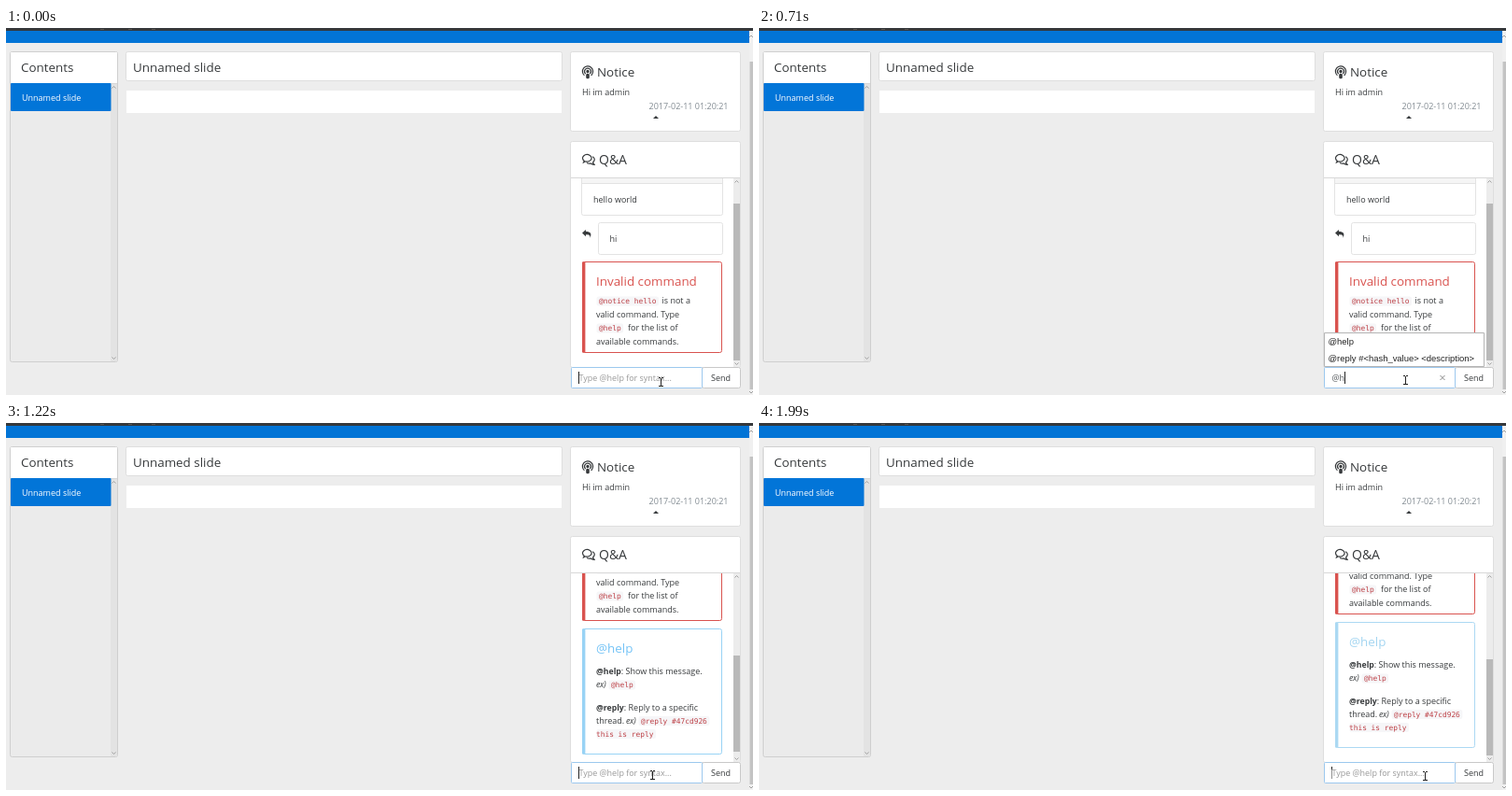
Animation of 800 by 393 pixels, one loop 2070 ms. Source, as an HTML page with a canvas:

```html
<!DOCTYPE html>
<html lang="en">
<head>
<meta charset="utf-8">
<title>Slide Q&amp;A</title>
<style>
html, body { margin: 0; width: 100%; height: 100%; overflow: hidden; background: #ededed; }
canvas { display: block; width: 100vw; height: 100vh; }
</style>
</head>
<body>
<canvas id="stage" width="800" height="393"></canvas>
<script>
const ctx = document.getElementById('stage').getContext('2d');
const LOOP = 2070;
const SANS = '"Open Sans", "Noto Sans", sans-serif';
const MONO = '"DejaVu Sans Mono", monospace';
const ARIAL = '"Liberation Sans", Arial, sans-serif';
const INK = '#373a3c', RED = '#d9534f', CODE = '#bd4147', BLUE = '#0275d8', FOCUS = '#9cc8ee';

// Each track is a list of [start time, value]; values hold until the next start.
const mouseTrack = [[0, [701, 379]], [80, [697, 378]], [160, [694, 377]], [240, [692, 377]], [1990, [713, 378]]];
const typedTrack = [[0, ''], [350, '@'], [710, '@h'], [850, '@he'], [920, '@hel'], [990, '@help'], [1140, '']];
const menuTrack = [[0, 0], [430, 2], [780, 1], [1140, 0]];
const caretTrack = [[0, 1], [1530, 0.6], [1610, 0.2], [1690, 0.5]];
const scrollTrack = [
  [0, { y: 0, thumb: 188, size: 168 }],
  [1140, { y: 20, thumb: 190, size: 103, title: '#84c5ee', edge: '#a6d8f5' }],
  [1220, { y: 136, thumb: 249, size: 103, title: '#74c3f6', edge: '#98d3f5' }],
  [1300, { y: 143, thumb: 253, size: 103, title: '#a3d5f1', edge: '#acd9f3' }]
];

function at(track, time) {
  let value = track[0][1];
  for (const [start, next] of track) if (time >= start) value = next;
  return value;
}

function rect(x, y, w, h, color) {
  ctx.fillStyle = color;
  ctx.fillRect(x, y, w, h);
}

function box(x, y, w, h, fill, border, radius = 2) {
  ctx.beginPath();
  ctx.roundRect(x + 0.5, y + 0.5, w - 1, h - 1, radius);
  if (fill) { ctx.fillStyle = fill; ctx.fill(); }
  if (border) { ctx.strokeStyle = border; ctx.lineWidth = 1; ctx.stroke(); }
}

// Draws text and returns its right edge.
function text(str, x, y, { size = 9, color = INK, style = '', family = SANS } = {}) {
  ctx.font = `${style} ${size}px ${family}`;
  ctx.fillStyle = color;
  ctx.fillText(str, x, y);
  return x + ctx.measureText(str).width;
}

const heading = (str, x, y, color = INK) => text(str, x, y, { size: 13.4, color });

function code(str, x, y, pad = 3) {
  const opts = { size: 7.85, color: CODE, family: MONO };
  ctx.font = `${opts.size}px ${MONO}`;
  const width = ctx.measureText(str).width;
  box(x, y - 8, width + pad + 3, 11, '#f6f6f8', null);
  text(str, x + pad, y, opts);
}

function triangle(x, y, half, height, color) {
  ctx.fillStyle = color;
  ctx.beginPath();
  ctx.moveTo(x - half, y + height);
  ctx.lineTo(x, y);
  ctx.lineTo(x + half, y + height);
  ctx.fill();
}

function chevron(x, y, dir) {
  ctx.strokeStyle = '#a0a0a0';
  ctx.lineWidth = 1;
  ctx.beginPath();
  ctx.moveTo(x - 2, y + dir);
  ctx.lineTo(x, y - dir);
  ctx.lineTo(x + 2, y + dir);
  ctx.stroke();
}

function podcastIcon(x, y) {
  ctx.strokeStyle = ctx.fillStyle = INK;
  ctx.lineWidth = 1.2;
  for (const r of [5.6, 3.4]) {
    ctx.beginPath();
    ctx.arc(x, y, r, Math.PI * 0.72, Math.PI * 2.28);
    ctx.stroke();
  }
  ctx.beginPath();
  ctx.arc(x, y, 1.7, 0, Math.PI * 2);
  ctx.roundRect(x - 1.8, y + 2.2, 3.6, 5.6, 1.5);
  ctx.fill();
}

function commentsIcon(x, y) {
  ctx.strokeStyle = INK;
  ctx.lineWidth = 1.2;
  ctx.beginPath();
  ctx.ellipse(x + 5.3, y + 4.3, 4.8, 3.7, 0, Math.PI * 0.72, Math.PI * 2.6);
  ctx.lineTo(x + 1.5, y + 9);
  ctx.closePath();
  ctx.stroke();
  ctx.beginPath();
  ctx.moveTo(x + 11.3, y + 2.6);
  ctx.quadraticCurveTo(x + 15.2, y + 5.8, x + 11.5, y + 9);
  ctx.lineTo(x + 13, y + 11.3);
  ctx.quadraticCurveTo(x + 10.5, y + 11, x + 9.3, y + 10);
  ctx.quadraticCurveTo(x + 6.5, y + 10.4, x + 5, y + 9.4);
  ctx.stroke();
}

function replyIcon(x, y) {
  ctx.fillStyle = INK;
  ctx.beginPath();
  ctx.moveTo(x, y + 3.6);
  ctx.lineTo(x + 4, y);
  ctx.lineTo(x + 4, y + 2.1);
  ctx.bezierCurveTo(x + 9, y + 2.1, x + 10.8, y + 4.5, x + 8.3, y + 9);
  ctx.bezierCurveTo(x + 9, y + 5.8, x + 7.5, y + 5.2, x + 4, y + 5.2);
  ctx.lineTo(x + 4, y + 7.2);
  ctx.fill();
}

function drawPage() {
  rect(0, 0, 800, 393, '#ededed');
  rect(0, 3, 796, 13, '#0274d6');
  rect(0, 0, 800, 3, '#35383b');
  for (const x of [101, 131, 156]) rect(x, 1, 4, 1, '#555');
  rect(796, 3, 4, 390, '#f0f0f0');
  rect(796.5, 36, 3.5, 351, '#c3c3c3');
  chevron(798, 9, 1);
  chevron(798, 390, -1);

  box(4, 25, 116, 333, '#ebebeb', '#cfcfcf');
  rect(5, 26, 114, 33, '#fff');
  rect(5, 59, 114, 1, '#d8d8d8');
  heading('Contents', 16, 47);
  rect(112, 60, 7, 297, '#e3e3e3');
  chevron(115.5, 63.5, 1);
  chevron(115.5, 353.5, -1);
  box(4.5, 58.5, 108.5, 31, BLUE, null, 1);
  text('Unnamed slide', 17, 78, { color: '#fff' });

  box(128, 25, 468, 32, '#fff', '#dedede');
  heading('Unnamed slide', 136, 47);
  rect(129, 67, 466, 24, '#fff');

  box(604, 25, 183, 86, '#fff', '#dedede');
  podcastIcon(623, 46.5);
  heading('Notice', 633, 51.5);
  text('Hi im admin', 617, 72);
  text('2017-02-11 01:20:21', 688.5, 86.5, { color: '#818a91' });
  triangle(696, 94, 3, 3, INK);

  box(604, 121, 183, 243, '#fff', '#dedede');
  rect(605, 160, 181, 1, '#d8d8d8');
  commentsIcon(617, 135);
  text('Q&A', 635, 146, { size: 14 });
}

function alertCard(y, h, title, color, edge) {
  box(617, y, 150, h, '#fff', edge);
  rect(617, y + 0.5, 3.4, h - 1, edge);
  heading(title, 632, y + 26, color);
}

function drawThread({ y, title, edge }) {
  ctx.save();
  ctx.beginPath();
  ctx.rect(605, 161, 174, 202);
  ctx.clip();
  ctx.translate(0, -y);

  box(616, 130, 152, 71, '#fff', '#e3e3e3');
  rect(617, 131, 150, 35, '#f5f5f5');
  rect(617, 166, 150, 1, '#e3e3e3');
  text('hello world', 629, 187);
  replyIcon(617, 216);
  box(634, 208, 134, 35, '#fff', '#e3e3e3');
  text('hi', 646.5, 229);

  alertCard(250, 98, 'Invalid command', RED, RED);
  code('@notice hello', 632, 295);
  text('is not a', 702.5, 295);
  text('valid command. Type', 632, 309.5);
  code('@help', 632, 324);
  text('for the list of', 666, 324);
  text('available commands.', 632, 338.5);

  if (title) {
    const bold = { style: 'bold', size: 8.7 }, italic = { style: 'italic', size: 8.7 };
    alertCard(356, 135, '@help', title, edge);
    text(': Show this message.', text('@help', 632, 405, bold), 405);
    text('ex)', 632, 419, italic);
    code('@help', 645, 419);
    text(': Reply to a specific', text('@reply', 632, 443.5, bold), 443.5);
    text('thread.', 632, 457.5);
    text('ex)', 664, 457.5, italic);
    code('@reply #47cd926', 677, 457.5);
    code('this is reply', 632, 471.5, 0);
  }
  ctx.restore();
}

function drawThreadBar({ thumb, size }) {
  rect(779, 161, 7, 202, '#ececec');
  rect(779, thumb, 7, size, '#b9b9b9');
  chevron(782.5, 164.5, 1);
  chevron(782.5, 359.5, -1);
}

function drawInput(typed, caret) {
  box(745, 363, 42, 23, '#fff', '#c9c9c9', 2);
  box(605, 363, 141, 23, '#fff', FOCUS, 1);
  text('Send', 755, 378);
  if (typed) {
    const end = text(typed, 613.5, 378, { color: '#55595c' });
    rect(Math.round(end), 368, 1, 13, '#222');
    ctx.strokeStyle = '#888';
    ctx.lineWidth = 1;
    ctx.beginPath();
    ctx.moveTo(729.5, 372); ctx.lineTo(734.5, 377);
    ctx.moveTo(734.5, 372); ctx.lineTo(729.5, 377);
    ctx.stroke();
  } else {
    text('Type @help for syntax...', 613.5, 378, { size: 8.95, color: '#999' });
    rect(613, 368, 1, 3, '#222');
    ctx.globalAlpha = caret;
    rect(613, 371, 1, 10, '#222');
    ctx.globalAlpha = 1;
  }
}

function drawMenu(rows) {
  if (!rows) return;
  const item = { size: 9.45, color: '#222', family: ARIAL };
  const top = rows === 2 ? 326 : 344;
  box(605, top, rows === 2 ? 172 : 141, 363 - top, '#fff', '#b5b5b5', 0);
  text('@help', 609.5, top + 13, item);
  if (rows === 2) text('@reply #<hash_value> <description>', 609.5, 357, item);
}

function drawMouse([x, y]) {
  rect(x, y - 4, 1, 9, '#222');
  for (const edge of [y - 5, y + 4]) {
    rect(x - 2, edge, 2, 1, '#222');
    rect(x + 1, edge, 2, 1, '#222');
  }
}

function render() {
  const time = performance.now() % LOOP;
  const scroll = at(scrollTrack, time);
  drawPage();
  drawThread(scroll);
  drawThreadBar(scroll);
  drawInput(at(typedTrack, time), at(caretTrack, time));
  drawMenu(at(menuTrack, time));
  drawMouse(at(mouseTrack, time));
  requestAnimationFrame(render);
}
render();
</script>
</body>
</html>
```
